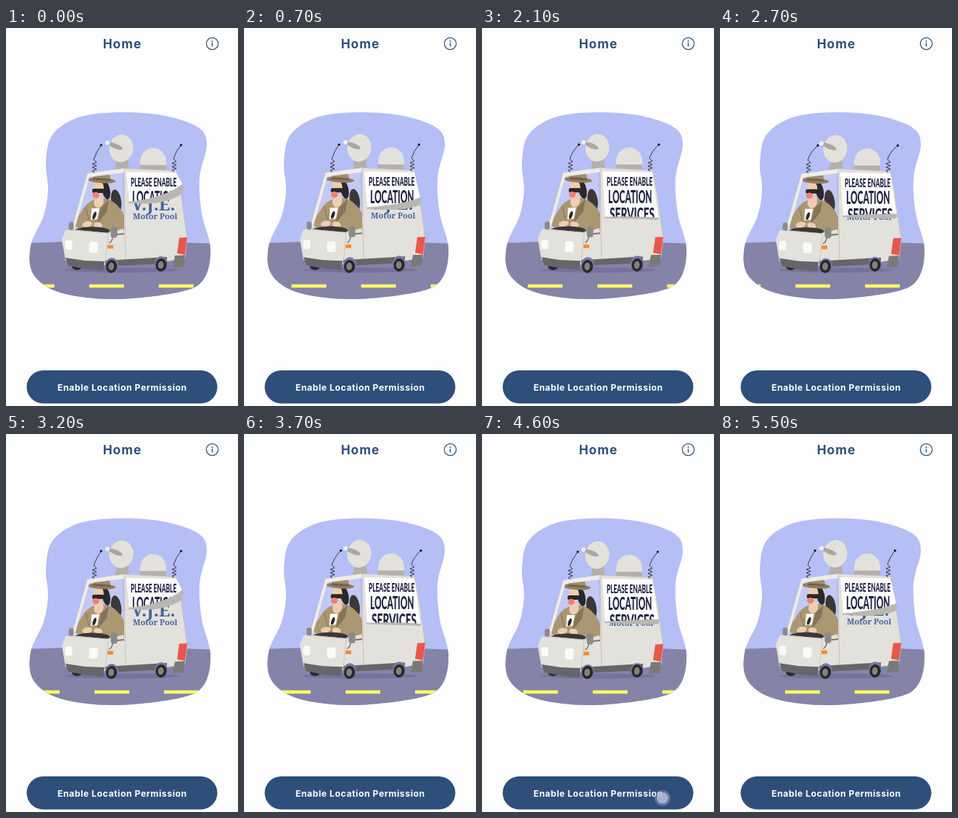
Write an HTML page with a canvas that moves like this. It is 320 by 520 pixels and loops after 5600 ms.

```html
<!DOCTYPE html>
<html lang="en">
<head>
<meta charset="utf-8">
<title>Home</title>
<style>
  html, body { margin: 0; width: 100%; height: 100%; overflow: hidden; background: #fefefe; }
  canvas { display: block; width: 320px; height: 520px; }
</style>
</head>
<body>
<canvas id="stage"></canvas>
<script>
const LOOP = 5600, BEAT = 800, DASH_GAP = 96, DASH_W = 48, TURN = Math.PI * 2;
const canvas = document.getElementById('stage');
const ctx = canvas.getContext('2d');
const ratio = window.devicePixelRatio || 1;
canvas.width = 320 * ratio;
canvas.height = 520 * ratio;

const C = {
  navy: '#2d4f7a', sky: '#b5bef5', road: '#8583a7', dash: '#fef966',
  body: '#e3e1dc', edge: '#c3c0ba', metal: '#b3b0ab', gray: '#8c8a88',
  bumper: '#66656a', dark: '#2a2829', arch: '#7778a7', coat: '#ab9771',
  fold: '#84745a', hat: '#8f7d60', skin: '#efcdb2', ink: '#1d2041', paint: '#46629a'
};

// Motion rules: the road speeds up in three stretches, the van sways on a steady beat.
function roadShift(t) {
  if (t < 2100) return 18.5 + t * .204;
  if (t < 4600) return 447 + (t - 2100) * .228;
  return 1016.5 + (t - 4600) * .25;
}
const bounce = p => 1 + Math.sin(3 * p * TURN);
const whip = p => -2 * Math.cos((p + .07) * TURN);
const flap = p => (.5 + .5 * Math.cos((p - .06) * TURN)) ** 1.6;
const pulse = t => Math.max(0, Math.min(1, (t - 4300) / 200, (4800 - t) / 150));

function fill(color) { ctx.fillStyle = color; ctx.fill(); }

function stroke(color, width) {
  ctx.strokeStyle = color;
  ctx.lineWidth = width;
  ctx.stroke();
}

function path(points) {
  ctx.beginPath();
  points.forEach(([x, y]) => ctx.lineTo(x, y));
}

function poly(color, ...points) { path(points); fill(color); }

function line(color, width, ...points) { path(points); stroke(color, width); }

function oval(color, x, y, rx, ry = rx, turn = 0) {
  ctx.beginPath();
  ctx.ellipse(x, y, rx, ry, turn, 0, TURN);
  fill(color);
}

function pill(color, x, y, w, h, r) {
  ctx.beginPath();
  ctx.roundRect(x, y, w, h, r);
  fill(color);
}

// Closed smooth curve through the points.
function smooth(points) {
  const n = points.length, at = i => points[(i + n) % n];
  ctx.beginPath();
  ctx.moveTo(...points[0]);
  for (let i = 0; i < n; i++) {
    const [a, b, c, d] = [at(i - 1), at(i), at(i + 1), at(i + 2)];
    ctx.bezierCurveTo(b[0] + (c[0] - a[0]) / 6, b[1] + (c[1] - a[1]) / 6,
      c[0] - (d[0] - b[0]) / 6, c[1] - (d[1] - b[1]) / 6, c[0], c[1]);
  }
}

function blob(color, ...points) { smooth(points); fill(color); }

function text(str, x, y, font, color, align = 'left', spacing = 0) {
  ctx.font = font;
  ctx.fillStyle = color;
  ctx.textAlign = align;
  ctx.letterSpacing = spacing + 'px';
  ctx.fillText(str, x, y);
}

// Narrow poster lettering.
function poster(str, x, y, size, narrow) {
  ctx.save();
  ctx.translate(x, y);
  ctx.scale(narrow, 1);
  text(str, 0, 0, `800 ${size}px Lato, sans-serif`, C.ink);
  ctx.restore();
}

function scenery(t) {
  ctx.save();
  smooth([[55, 185], [64, 147], [100, 123], [155, 116], [215, 120], [264, 136], [277, 160],
    [267, 205], [270, 255], [282, 303], [273, 345], [240, 363], [150, 373], [75, 364],
    [38, 339], [34, 300], [52, 258], [58, 222]]);
  ctx.clip();
  ctx.fillStyle = C.sky;
  ctx.fillRect(25, 110, 265, 270);
  ctx.beginPath();
  ctx.moveTo(25, 296);
  ctx.quadraticCurveTo(155, 290, 290, 297);
  ctx.lineTo(290, 380);
  ctx.lineTo(25, 380);
  fill(C.road);
  ctx.fillStyle = C.dash;
  const start = roadShift(t) % DASH_GAP - DASH_GAP;
  for (let x = start; x < 290; x += DASH_GAP) ctx.fillRect(x, 352.6, DASH_W, 4.6);
  ctx.restore();
}

function antenna(x, y, tipX, tipY) {
  ctx.beginPath();
  ctx.moveTo(x, y);
  for (let i = 1; i <= 6; i++) ctx.lineTo(x + (i % 2 ? -3 : 3), y - i * 2.4);
  ctx.lineTo(x - 1, y - 18);
  ctx.quadraticCurveTo(x + 2, y - 28, tipX, tipY);
  stroke('#26262c', .9);
  oval('#111116', tipX, tipY, 1.6);
}

function dishes() {
  poly(C.metal, [153, 179], [168, 179], [170, 195], [150, 195]);
  oval(C.body, 159, 164.5, 16.5, 19, .15);
  oval('#aaa7a2', 151, 161.5, 10.5, 3.4, .4);
  oval('#f0efec', 140, 157, 3);
  ctx.beginPath();
  ctx.ellipse(203, 183, 18, 19, 0, Math.PI, 0);
  fill(C.body);
  ctx.fillRect(185, 182, 36, 6);
  poly(C.metal, [185, 187.5], [220.5, 187.5], [221, 196], [184, 195]);
}

function driver() {
  oval('#3b3837', 152, 237, 7, 16, -.15);
  blob(C.coat, [99, 274], [105, 250], [120, 236], [142, 235], [161, 253], [162, 278]);
  poly(C.fold, [131, 246], [142, 235], [139, 252], [125, 269]);
  oval(C.dark, 138, 222, 5.5, 13, -.2);
  oval(C.skin, 128, 219, 7, 10);
  oval(C.skin, 128, 238, 6.5, 8.5, .3);
  poly('#fbfaf8', [118, 247], [129, 247], [126, 262], [117, 263]);
  oval(C.dark, 122, 257, 2.2, 5.5, .35);
  line(C.fold, 1, [110, 245], [115, 265]);
  pill(C.dark, 119, 220, 17, 6, 2.5);
  oval('#f08176', 124, 229, 4.6, 4.2);
  oval('#a08d6d', 126, 204, 6, 6);
  oval('#a08d6d', 137, 205, 7, 7);
  oval(C.hat, 131.5, 208.5, 19.5, 3.8, .07);
  line('#6b5a45', 2.2, [120, 206.5], [144, 208]);
  oval(C.skin, 112, 269, 7, 4, -.2);
  oval(C.skin, 127, 270, 6, 4, .2);
}

function cab(bob) {
  poly('#c4c9f3', [111, 202], [160, 195], [163, 280], [96, 278]);
  ctx.save();
  ctx.translate(1 - bob, 0);
  driver();
  ctx.restore();
  oval('#3a3736', 119, 278, 24, 5.5);
  poly('#efede9', [112, 199], [163, 192], [163, 198], [115, 204], [94, 278], [90, 277]);
  line(C.edge, .7, [112, 199], [90, 277]);
  poly(C.body, [82, 277], [90, 276], [141, 281], [162, 275], [166, 322], [135, 325], [82, 319], [77, 290]);
  line(C.edge, .8, [90, 277], [141, 281], [137, 322]);
  pill('#fafafa', 81.5, 291, 10, 13, 3.5);
  pill('#fafafa', 114.5, 293, 12, 15, 3.5);
  pill('#f78b32', 140, 297.5, 8, 5, .5);
  poly(C.bumper, [82, 315], [109, 319], [136, 320], [134, 333], [112, 331], [86, 326]);
}

function cargo() {
  const rear = [[163, 192], [235, 195.5], [241, 225], [250, 290]];
  poly(C.body, ...rear, [247, 316], [222, 320], [163, 325]);
  line(C.edge, .8, ...rear);
  line(C.edge, .9, [163, 192], [165, 324]);
  poly(C.bumper, [137, 319], [222, 314], [222, 323], [158, 326], [137, 327]);
  poly('#7b7978', [233, 312], [247, 311.5], [245, 327], [230, 328]);
  poly('#e8574a', [239, 287.5], [250, 287], [247, 311], [236, 309]);
}

// The banner rolls up from its lower right corner and bares the paint below.
function sign(lift) {
  text('V.J.E.', 173, 250, "700 24px 'Noto Serif', serif", C.paint);
  text('Motor Pool', 175, 262, "600 11px 'Noto Serif', serif", C.paint);

  const left = 261 - 23 * lift, right = 261 - 50 * lift;
  const thick = 2 + 12 * Math.sqrt(lift);
  ctx.save();
  path([[166, 197], [235, 198.5], [243, right]]);
  ctx.quadraticCurveTo(218, left - 1, 170, left - 1);
  fill('#fdfdfd');
  ctx.clip();
  poster('PLEASE ENABLE', 172, 217, 16, .52);
  poster('LOCATION', 174, 240.5, 25, .475);
  poster('SERVICES', 176, 264.5, 24, .57);
  ctx.restore();

  path([[169, left - 1.5]]);
  ctx.quadraticCurveTo(218, left - 2 - thick * .3, 243, right);
  ctx.quadraticCurveTo(247, right + thick * .4, 242, right + thick);
  ctx.quadraticCurveTo(218, left + thick * .4, 169, left + .5);
  fill('#b9b7b3');
}

function mirrors() {
  line('#77756f', 1.5, [152, 276], [145, 293], [142, 295]);
  line('#77756f', 2, [153, 283], [163, 282]);
  pill(C.gray, 144.5, 272.5, 9, 15, 3.5);
  pill(C.gray, 86.5, 266, 7, 11, 3);
}

function wheel(x, y) {
  oval(C.dark, x, y, 7.6, 9, .1);
  oval('#85827d', x - .4, y, 3.9, 5.2, .1);
}

function van(t) {
  const p = t / BEAT % 1, bob = bounce(p), sway = whip(p);
  oval('#75739a', 160, 333, 79, 3.5);
  oval(C.dark, 98, 328, 7, 5);
  ctx.save();
  ctx.translate(0, bob);
  dishes();
  cab(bob);
  cargo();
  sign(flap(p));
  antenna(122, 198, 133 + sway, 160);
  antenna(232, 197, 243.3 + sway, 160);
  mirrors();
  oval(C.arch, 146, 325, 9, 10);
  oval(C.arch, 214, 323, 9, 10);
  ctx.restore();
  wheel(145.5, 328);
  wheel(214, 326);
}

function chrome(t) {
  text('Home', 160.5, 28, '700 17.2px Inter, sans-serif', C.navy, 'center', 1.1);
  ctx.beginPath();
  ctx.arc(284.5, 21.5, 8.2, 0, TURN);
  stroke(C.navy, 1.2);
  oval(C.navy, 284.5, 18.2, 1);
  line(C.navy, 1.5, [284.5, 20.4], [284.5, 25.4]);

  pill(C.navy, 28.5, 471, 263, 45.5, 22.7);
  text('Enable Location Permission', 160.3, 499, '700 12.2px Inter, sans-serif', '#fff', 'center', .56);

  ctx.globalAlpha = pulse(t);
  oval('rgba(140,153,190,.5)', 249, 500.8, 11);
  oval('rgba(196,204,226,.7)', 249, 500.8, 7.8);
  ctx.globalAlpha = 1;
}

function draw(t) {
  ctx.setTransform(ratio, 0, 0, ratio, 0, 0);
  ctx.fillStyle = '#fefefe';
  ctx.fillRect(0, 0, 320, 520);
  scenery(t);
  van(t);
  chrome(t);
}

const begin = performance.now();
function tick() {
  draw((performance.now() - begin) % LOOP);
  requestAnimationFrame(tick);
}
tick();
</script>
</body>
</html>
```
